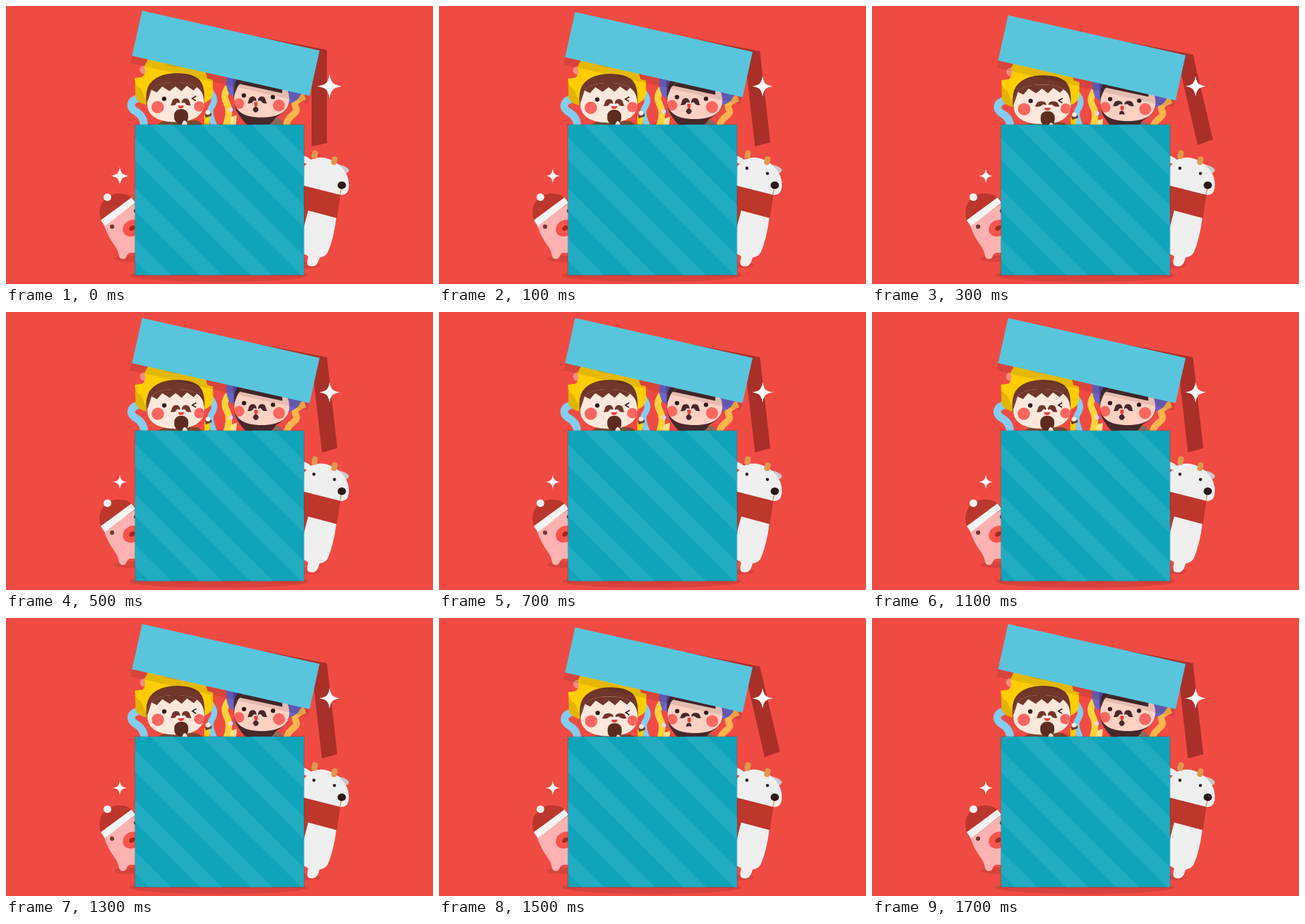
An HTML page that plays this animation: 640x418 px, repeating every 1.8 s.

```html
<!DOCTYPE html>
<html lang="en">
<head>
<meta charset="utf-8">
<title>Gift box</title>
<style>
  html, body { margin: 0; width: 100%; height: 100%; overflow: hidden; background: #f04b43; }
  svg { display: block; width: 100vw; height: 100vh; }
</style>
</head>
<body>
<svg viewBox="0 0 640 418">
  <defs>
    <path id="spark" fill="#fff" d="M0-1C.12-.28.28-.12 1 0C.28.12.12.28 0 1C-.12.28-.28.12-1 0C-.28-.12-.12-.28 0-1Z"/>
    <path id="half" d="M-1.500 0Q-3-5-8-4.500Q-13-4-14 1.500Q-14.500 4.500-16 5.500Q-9 7.500-6.500 2.500Q-4.500 1-1.500 3Z"/>
    <path id="headA" d="M211.500 146C211 165 228 174.500 254 174.500S297 165 297 146C297 125 285 115 254 115S212 125 211.500 146Z"/>
    <path id="headB" d="M342 138C341 158 356 167.500 383 167.500S424 158 424.500 140C424 120 412 109 383 109S343 118 342 138Z"/>
    <clipPath id="boxClip"><path d="M193.500 178.500H446.500V404.500H193.500Z"/></clipPath>
    <clipPath id="faceA"><use href="#headA"/></clipPath>
    <clipPath id="faceB"><use href="#headB"/></clipPath>
  </defs>

  <rect width="640" height="418" fill="#f04b43"/>
  <g fill="#d8423c">
    <ellipse cx="319" cy="405" rx="135" ry="10"/>
    <ellipse cx="184" cy="380" rx="22" ry="5"/>
    <ellipse cx="450" cy="390" rx="22" ry="4.500"/>
  </g>

  <!-- pig -->
  <g>
    <path fill="#fdb2b1" d="M147 330L194 297V371H186Q182 372 181 376Q179 380.500 175 380.500Q170 380 169 374Q168 367 162 359Q153 347 147 330Z"/>
    <path fill="#bb362b" d="M142 322Q137 304 146 293Q157 280 172 282Q184 283 189 289Z"/>
    <path fill="#f6f4f3" d="M142 322L188 288L194 296L148 331Z"/>
    <circle cx="152" cy="287.500" r="5.800" fill="#f6f4f3"/>
    <ellipse cx="189" cy="334" rx="14.500" ry="12" fill="#f9544c" transform="rotate(-30 189 334)"/>
    <ellipse cx="189" cy="334" rx="4.800" ry="3.500" fill="#a5281f" transform="rotate(-35 189 334)"/>
    <g id="pigEyes" fill="#6f3c30"><circle cx="159" cy="331.800" r="3.200"/><circle cx="194.500" cy="308" r="3"/></g>
  </g>

  <!-- goat -->
  <g>
    <path fill="#c9c9c9" d="M494 238Q509 239 514 246Q514 252 504 252Z"/>
    <path fill="#efefef" d="M440 224Q450 225 457 231Q470 225 484 230Q505 238 512 257Q516 270 512 279Q509 285 500 284L495 319Q491 351 482 371Q478 377 470 378Q468 387 464 390Q459 393 453 390Q450 387 453 377Q451 373 440 372Z"/>
    <path fill="#f04b43" d="M446 236L451 237L446 242Z"/>
    <path fill="#bd372b" d="M440 268.500L501 284L496 319L440 304Z"/>
    <path fill="#bd372b" d="M440 302L453 307L446 334L440 340Z"/>
    <g fill="#e0984f">
      <rect x="458.500" y="217" width="8.500" height="13" rx="4" transform="rotate(14 463 223)"/>
      <rect x="488" y="226" width="8.500" height="13" rx="4" transform="rotate(14 492 232)"/>
    </g>
    <path d="M503 272L500.500 284" stroke="#dd9b63" stroke-width="1.500"/>
    <ellipse cx="503.300" cy="269.500" rx="6.300" ry="5.700" fill="#2d1a18"/>
    <g id="goatEyes" fill="#2d1a18"><circle cx="461.500" cy="244" r="2.400"/><circle cx="492.300" cy="251.800" r="2.400"/></g>
  </g>

  <path id="flap" fill="#a92f29"/>

  <!-- left child -->
  <g id="left">
    <g fill="none" stroke="#83cdf1" stroke-width="11.500">
      <path d="M202 138C184 141 184 153 195 159Q208 166 207 184"/>
      <path d="M305 126C316 140 312 146 307 154Q304 162 313 182" stroke-width="9"/>
    </g>
    <circle cx="207" cy="96" r="6.500" fill="#f68a80"/>
    <path fill="#e3b300" d="M193 108L212 106V149Q197 146 194 137Z"/>
    <path fill="#ffcd02" d="M214 78L207 91Q211 101 204 107L193 109Q194 122 202 124L212 146H296Q308 142 310 132V111L302 109Q299 102 298 88Z"/>
    <path fill="#e3b300" d="M235 88Q258 94 276 92L262 86Z"/>
    <path fill="#70372a" d="M211 150Q207 124 219 113Q232 101 256 101Q280 101 290 111Q299 121 297 146Z"/>
    <path fill="#7c4a30" d="M225 182Q230 172 245 172H285Q293 174 296 182Z"/>
    <use href="#headA" fill="#fee8db"/>
    <g clip-path="url(#faceA)">
      <path fill="#70372a" d="M205 100H305V142L295 124L288 120L281 127L271 120L263 128L254 121L245 128L234 121L226 130L218 126L212 144H205Z"/>
      <circle cx="227.300" cy="152" r="9.300" fill="#fb675f"/>
      <circle cx="289.500" cy="151" r="7.800" fill="#fb675f"/>
    </g>
    <circle cx="237" cy="139.600" r="3.300" fill="#2f1d1b"/>
    <path d="M285 135.500L279 139L284.500 142.500" fill="none" stroke="#2f1d1b" stroke-width="1.700"/>
    <path fill="#fff" d="M257.500 147H267V151H257.500Z"/>
    <path fill="#ec3f36" d="M257.500 149.500H267Q266 154 262 154Q258.500 154 257.500 149.500Z"/>
    <g id="tacheA" fill="#70372a"><use href="#half"/><use href="#half" transform="scale(-1 1)"/></g>
    <rect x="252" y="155" width="21" height="22" rx="9" fill="#5d2c20"/>
    <path fill="#fee8db" d="M264 182Q263 175 267 172Q272 172 272 182Z"/>
    <path fill="#ffcd02" d="M297 164H306L304 182H297Z"/>
    <path fill="#654036" d="M298 163L308 161V165L299 168Z"/>
    <circle cx="302.500" cy="160" r="3.500" fill="#fee8db"/>
  </g>

  <!-- right child -->
  <g id="right">
    <g fill="none" stroke-width="10">
      <path stroke="#ffd33c" d="M333 122C323 137 330 142 333 152Q336 162 329 182"/>
      <path stroke="#ffb44c" d="M448 136C432 142 431 147 435 154C438 164 420 162 420 184"/>
    </g>
    <path fill="#6c63c2" d="M331 100Q328 122 335 133L345 138V100Z"/>
    <path fill="#6c63c2" d="M412 110L443 128Q440 143 424 147Z"/>
    <path fill="#544ca8" d="M340 108L347 110V136L341 134Z"/>
    <path fill="#8b6a5d" d="M394 182Q398 170 408 168Q416 172 416 182Z"/>
    <path fill="#47292a" d="M342 145Q339 115 350 107L416 120Q425 130 424 147Q419 160 405 167Q398 178 388 182H366Q357 176 350 165Q343 156 342 145Z"/>
    <use href="#headB" fill="#fed1c3"/>
    <g clip-path="url(#faceB)">
      <path fill="#47292a" d="M340 100H414V131L349 117L343 132H340Z"/>
      <circle cx="349" cy="146.800" r="8" fill="#fb675f"/>
      <circle cx="409" cy="149.500" r="9" fill="#fb675f"/>
    </g>
    <circle cx="356.500" cy="134.500" r="3.300" fill="#2f1d1b"/>
    <circle cx="400" cy="137" r="3.300" fill="#2f1d1b"/>
    <path fill="#ec3f36" d="M372 144.500H377V149Q376.500 151.500 374.500 151.500Q372.500 151.500 372 149Z"/>
    <g id="tacheB" fill="#47292a"><use href="#half"/><use href="#half" transform="scale(-1 1)"/></g>
    <path id="mouthB" fill="#47292a"/>
    <path fill="#ffe08a" d="M337 167L346 164L344 184H335Z"/>
    <path fill="#6c63c2" d="M334 154L341 152L342 159H337Z"/>
    <circle cx="336.500" cy="156" r="3.500" fill="#fed1c3"/>
  </g>

  <!-- lid -->
  <g id="lid">
    <path fill="#000" fill-opacity=".1" d="M189 75L455 135L452 146L186 86Z"/>
    <path fill="#58c5dd" d="M204 7L470 67L455 135L189 75Z"/>
  </g>

  <!-- box -->
  <path fill="#10a4ba" stroke="#000" stroke-opacity=".16" stroke-width="2" paint-order="stroke" d="M193.500 178.500H446.500V404.500H193.500Z"/>
  <g id="stripes" clip-path="url(#boxClip)" fill="#22acc1"></g>

  <use id="sparkA" href="#spark"/>
  <use id="sparkB" href="#spark"/>
</svg>
<script>
  const $ = id => document.getElementById(id);
  const set = (id, name, value) => $(id).setAttribute(name, value);
  const move = (id, x, y, sx = 1, sy = sx) =>
    set(id, 'transform', `translate(${x} ${y}) scale(${sx} ${sy})`);

  const STEP = 100, STEPS = 18;
  const GOAT_BLINK = 0, PIG_BLINK = 15;

  // One bob is six steps; the second half mirrors the first.
  const LID = [0, 2, 5, 7];
  const SWING = [0, .52, .86, 1];
  const LEFT = [0, 1, 2.3, 3.2];
  const RIGHT = [0, 2.5, 4.6, 5.5];
  const WIDEN = [0, .02, .12, .22];

  let stripes = '';
  for (let x = -88; x < 446; x += 76) stripes += `M${x} 178h33l227 227h-33Z`;
  $('stripes').innerHTML = `<path d="${stripes}"/>`;

  // The free end swings out and rises, so the flap looks shorter.
  function drawFlap(lid, swing) {
    const top = 66 + lid;
    const endX = 481 + 30 * swing, endY = top + 140 - 12 * swing * swing;
    set('flap', 'd', `M375 ${45.5 + lid}L481 ${top}L${endX} ${endY}` +
      `L${endX - 23} ${endY + 5 + 3 * swing}L458 ${top + 6}Z`);
  }

  function draw(step) {
    const phase = step % 6, i = Math.min(phase, 6 - phase);
    const wide = WIDEN[i];
    move('lid', 0, LID[i]);
    drawFlap(LID[i], SWING[i]);
    move('left', LEFT[i] / 4, LEFT[i]);
    move('right', RIGHT[i] / 12, RIGHT[i]);
    move('tacheA', 262, 143.5, .97 + wide, 1 - wide);
    move('tacheB', 376.5, 140.5, .92 + wide / 2, 1 - wide);
    set('mouthB', 'd', i === 3
      ? 'M370 158Q370 152 374 152Q378 152 378 158Q374 156.500 370 158Z'
      : 'M374.200 151Q378.500 153 378.500 156Q377 160 374.200 160Q371.500 160 370 156Q370 153 374.200 151Z');

    const big = phase % 2 === 0;
    move('sparkA', 485, 120.7, big ? 18.5 : 15.5);
    move('sparkB', 170.6, 255.5, big ? 13.5 : 10.5);
    set('goatEyes', 'visibility', step === GOAT_BLINK ? 'hidden' : 'visible');
    set('pigEyes', 'visibility', step === PIG_BLINK ? 'hidden' : 'visible');
  }

  const start = performance.now();
  function tick() {
    draw(Math.floor((performance.now() - start) / STEP) % STEPS);
    requestAnimationFrame(tick);
  }
  tick();
</script>
</body>
</html>
```
